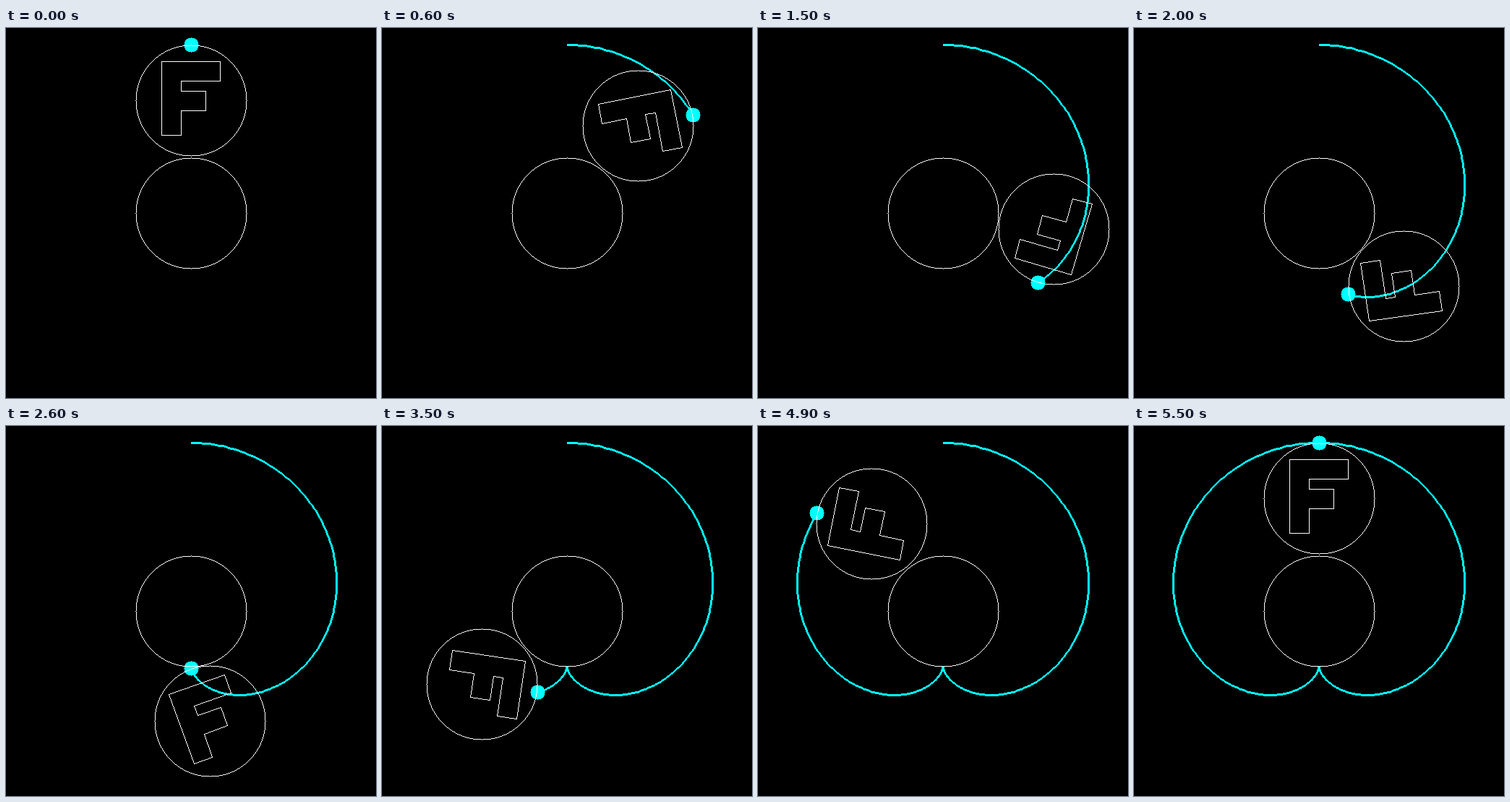
An HTML page with a canvas for the animation above (5600 ms loop, 512 by 512 pixels).

```html
<!DOCTYPE html>
<html lang="en">
<head>
<meta charset="utf-8">
<title>Rolling circle</title>
<style>
  html, body { margin: 0; width: 100%; height: 100%; overflow: hidden; background: #000; }
  canvas { display: block; width: 512px; height: 512px; }
</style>
</head>
<body>
<canvas id="stage" width="512" height="512"></canvas>
<script>
const ctx = document.getElementById('stage').getContext('2d');
const MID = 256;
const ORBIT = MID / 1.65;
const RADIUS = Math.floor(ORBIT / 2);
const DOT = 10;
const UNIT = ORBIT * 0.04375;
const STEPS = 55;
const STEP_MS = 100;
const TRACE_PARTS = 8;
const LETTER = [[-6, -8], [6, -8], [6, -4], [-2, -4], [-2, -2],
                [3, -2], [3, 2], [-2, 2], [-2, 7], [-6, 7]];

const angleAt = step => step / STEPS * 2 * Math.PI;

// Pixel containing a point; the nudge absorbs rounding errors in sin and cos.
const pixel = point => point.map(v => Math.floor(v + 1e-6));

function centerAt(step) {
  const a = angleAt(step);
  return [MID + ORBIT * Math.sin(a), MID - ORBIT * Math.cos(a)];
}

function penAt(step) {
  const [x, y] = centerAt(step);
  const a = 2 * angleAt(step);
  return [x + ORBIT / 2 * Math.sin(a), y - ORBIT / 2 * Math.cos(a)];
}

// Crisp line without smoothing, thickened across its minor axis.
function line(from, to, width) {
  const [x0, y0] = pixel(from);
  const [x1, y1] = pixel(to);
  const dx = x1 - x0, dy = y1 - y0;
  const flat = Math.abs(dx) >= Math.abs(dy);
  const n = Math.max(Math.abs(dx), Math.abs(dy), 1);
  const half = (width - 1) / 2;
  for (let i = 0; i <= n; i++) {
    const x = Math.round(x0 + dx * i / n);
    const y = Math.round(y0 + dy * i / n);
    if (flat) ctx.fillRect(x, y - half, 1, width);
    else ctx.fillRect(x - half, y, width, 1);
  }
}

const halfChord = (r, a) => Math.floor(Math.sqrt(r * r - a * a));

function ring(center, r) {
  const [cx, cy] = pixel(center);
  for (let a = 0; a <= r * Math.SQRT1_2; a++) {
    const b = halfChord(r, a);
    for (const [x, y] of [[a, b], [b, a]]) {
      ctx.fillRect(cx + x, cy + y, 1, 1);
      ctx.fillRect(cx - x, cy + y, 1, 1);
      ctx.fillRect(cx + x, cy - y, 1, 1);
      ctx.fillRect(cx - x, cy - y, 1, 1);
    }
  }
}

function disc(center, r) {
  const [cx, cy] = pixel(center);
  for (let y = -r; y <= r; y++) {
    const w = halfChord(r, y);
    ctx.fillRect(cx - w, cy + y, 2 * w + 1, 1);
  }
}

function trace(step) {
  for (let i = 1; i <= step * TRACE_PARTS; i++) {
    line(penAt((i - 1) / TRACE_PARTS), penAt(i / TRACE_PARTS), 3);
  }
}

function letter(center, turn) {
  const c = Math.cos(turn) * UNIT, s = Math.sin(turn) * UNIT;
  const points = LETTER.map(([x, y]) =>
    [center[0] + x * c - y * s, center[1] + x * s + y * c]);
  points.forEach((p, i) => line(p, points[(i + 1) % points.length], 1));
}

function draw(step) {
  ctx.fillStyle = '#000';
  ctx.fillRect(0, 0, 512, 512);

  ctx.fillStyle = '#0ff';
  trace(step);
  disc(penAt(step), DOT);

  ctx.fillStyle = '#fff';
  const center = centerAt(step);
  ring([MID, MID], RADIUS);
  ring(center, RADIUS);
  letter(center, 2 * angleAt(step));
}

function tick() {
  draw(Math.floor(performance.now() / STEP_MS) % (STEPS + 1));
  requestAnimationFrame(tick);
}
tick();
</script>
</body>
</html>
```
